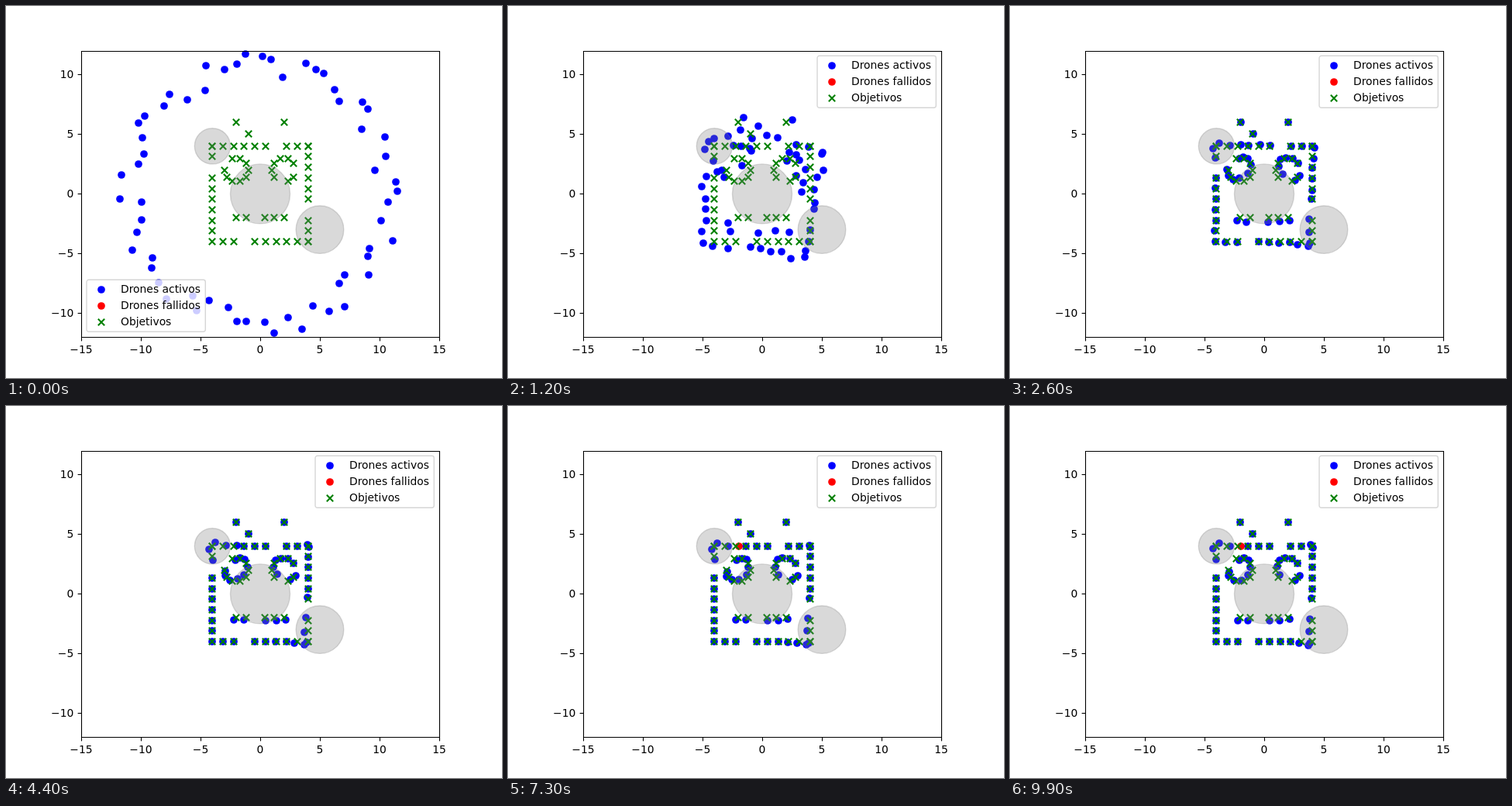
An HTML page that plays this animation: 640x480 px, repeating every 10 s.

```html
<!DOCTYPE html>
<html lang="es">
<head>
<meta charset="utf-8">
<style>
  html, body { margin: 0; width: 100%; height: 100%; overflow: hidden; background: #fff; }
  svg { display: block; width: 640px; height: 480px; font: 13.889px "DejaVu Sans", sans-serif; }
  .axis { fill: none; stroke: #000; stroke-width: 1.11; }
  .goal { fill: none; stroke: #008000; stroke-width: 2.08; }
  .obstacle { fill: #808080; stroke: #808080; stroke-width: 1.39; fill-opacity: .3; stroke-opacity: .3; }
  .frame { fill: #fff; stroke: #ccc; stroke-width: 1.39; opacity: .8; }
</style>
</head>
<body>
<svg id="stage" viewBox="0 0 640 480"></svg>
<script>
const stage = document.getElementById('stage');
const UNIT = 15.4, DOT = 4.86, STEP = 100, FRAMES = 100;
const LEGEND_MOVE = 4, SETTLED = 12, FAIL = 50;
const px = x => 328 + UNIT * x;
const py = y => 242.4 - UNIT * y;

function add(parent, tag, attrs, text) {
  const node = document.createElementNS('http://www.w3.org/2000/svg', tag);
  for (const key in attrs) node.setAttribute(key, attrs[key]);
  if (text) node.textContent = text;
  return parent.appendChild(node);
}

// Seeded value between -1 and 1.
function noise(n) {
  const v = Math.sin(n * 12.9898) * 43758.5453;
  return (v - Math.floor(v)) * 2 - 1;
}

// Goals: a cat's face on evenly spaced points, with a few left out.
const spots = (count, skip, at) =>
  [...Array(count).keys()].filter(i => !skip.includes(i)).map(at);
const grid = i => -4 + i * 8 / 9;
const eye = cx => i => [cx + Math.cos(i * Math.PI / 5), 2 + Math.sin(i * Math.PI / 5)];
const goals = [
  ...spots(10, [7], i => [-4, grid(i)]),
  ...spots(10, [3], i => [4, grid(i)]),
  ...spots(10, [6], i => [grid(i), 4]),
  ...spots(10, [0, 3], i => [grid(i), -4]),
  ...spots(10, [4], eye(-2)),
  ...spots(10, [0, 7], eye(2)),
  ...spots(6, [2], i => [-2 + .8 * i, -2]),
  [-2, 6], [-1, 5], [2, 6]
].sort((a, b) => Math.atan2(a[1], a[0]) - Math.atan2(b[1], b[0]));

const obstacles = [[0, 0, 2.5], [-4, 4, 1.5], [5, -3, 2]];

// Resting place: drones sharing a goal part, and obstacles push them outwards.
function settle([x, y], i) {
  const twin = goals.findIndex((g, j) => j !== i && g[0] === x && g[1] === y);
  const part = twin < 0 ? 0 : .02 * Math.sign(twin - i);
  let [rx, ry] = [x - part * y, y + part * x];
  for (const [ox, oy, r] of obstacles) {
    const dx = rx - ox, dy = ry - oy, dist = Math.hypot(dx, dy);
    const push = .27 * Math.min(1, Math.max(0, (r + 1 - dist) / .5));
    rx += push * dx / dist;
    ry += push * dy / dist;
  }
  return [rx, ry];
}

// Drones start on a rough ring, each heading for the goal in its direction.
const drones = goals.map((goal, i) => {
  const angle = (6 * i - 180 + 2.5 * noise(i + 1)) * Math.PI / 180;
  const radius = 10.85 + 1.05 * noise(i + 101);
  const rest = settle(goal, i);
  return {
    goal, rest,
    start: [radius * Math.cos(angle), radius * Math.sin(angle)],
    decay: .84 + .03 * noise(i + 201),
    restless: Math.hypot(rest[0] - goal[0], rest[1] - goal[1]) > .01,
    fails: goal[0] === grid(2) && goal[1] === 4
  };
});

const cross = (parent, x, y) =>
  add(parent, 'path', { class: 'goal', d: `M${x - 4.17} ${y - 4.17}l8.34 8.34m0-8.34l-8.34 8.34` });

for (const d of drones) d.dot = add(stage, 'circle', { r: DOT });
for (const [x, y] of goals) cross(stage, Math.round(px(x)), Math.round(py(y)));
for (const [x, y, r] of obstacles)
  add(stage, 'circle', { class: 'obstacle', cx: px(x), cy: py(y), r: r * UNIT });

// Axes
const snap = v => Math.floor(v + .5) + .5;
const label = v => String(v).replace('-', '\u2212');
add(stage, 'path', { class: 'axis', d: 'M97.5 58.5H559.5V427.5H97.5Z' });
for (let v = -15; v <= 15; v += 5) {
  add(stage, 'path', { class: 'axis', d: `M${snap(px(v))} 427.5v4.9` });
  add(stage, 'text', { x: px(v), y: 448, 'text-anchor': 'middle' }, label(v));
  if (Math.abs(v) > 10) continue;
  add(stage, 'path', { class: 'axis', d: `M97.5 ${snap(py(v))}h-4.9` });
  add(stage, 'text', { x: 87.3, y: Math.floor(py(v) + 5), 'text-anchor': 'end' }, label(v));
}

// Legend
const legend = add(stage, 'g', {});
add(legend, 'rect', { class: 'frame', y: .3, width: 153.3, height: 67, rx: 2.8 });
['Drones activos', 'Drones fallidos', 'Objetivos'].forEach((name, i) => {
  const y = 13 + 21 * i;
  if (i < 2) add(legend, 'circle', { cx: 19, cy: y, r: DOT, fill: ['#00f', '#f00'][i] });
  else cross(legend, 19, y);
  add(legend, 'text', { x: 44, y: y + 4 }, name);
});

function place(d, i, frame) {
  const k = d.decay ** frame;
  const still = !d.restless || frame < SETTLED || (d.fails && frame >= FAIL);
  const shake = still ? 0 : .05;
  return d.rest.map((to, axis) =>
    to + (d.start[axis] - to) * k + shake * noise(frame * 131 + i * 2 + axis));
}

function draw(now) {
  const frame = Math.floor(now / STEP) % FRAMES;
  drones.forEach((d, i) => {
    const [x, y] = place(d, i, frame);
    d.dot.setAttribute('cx', Math.round(px(x)));
    d.dot.setAttribute('cy', Math.round(py(y)));
    d.dot.setAttribute('fill', d.fails && frame >= FAIL ? '#f00' : '#00f');
  });
  legend.setAttribute('transform', `translate(${frame < LEGEND_MOVE ? '104 353' : '399 64'})`);
}

const began = performance.now();
function tick() {
  draw(performance.now() - began);
  requestAnimationFrame(tick);
}
tick();
</script>
</body>
</html>
```
